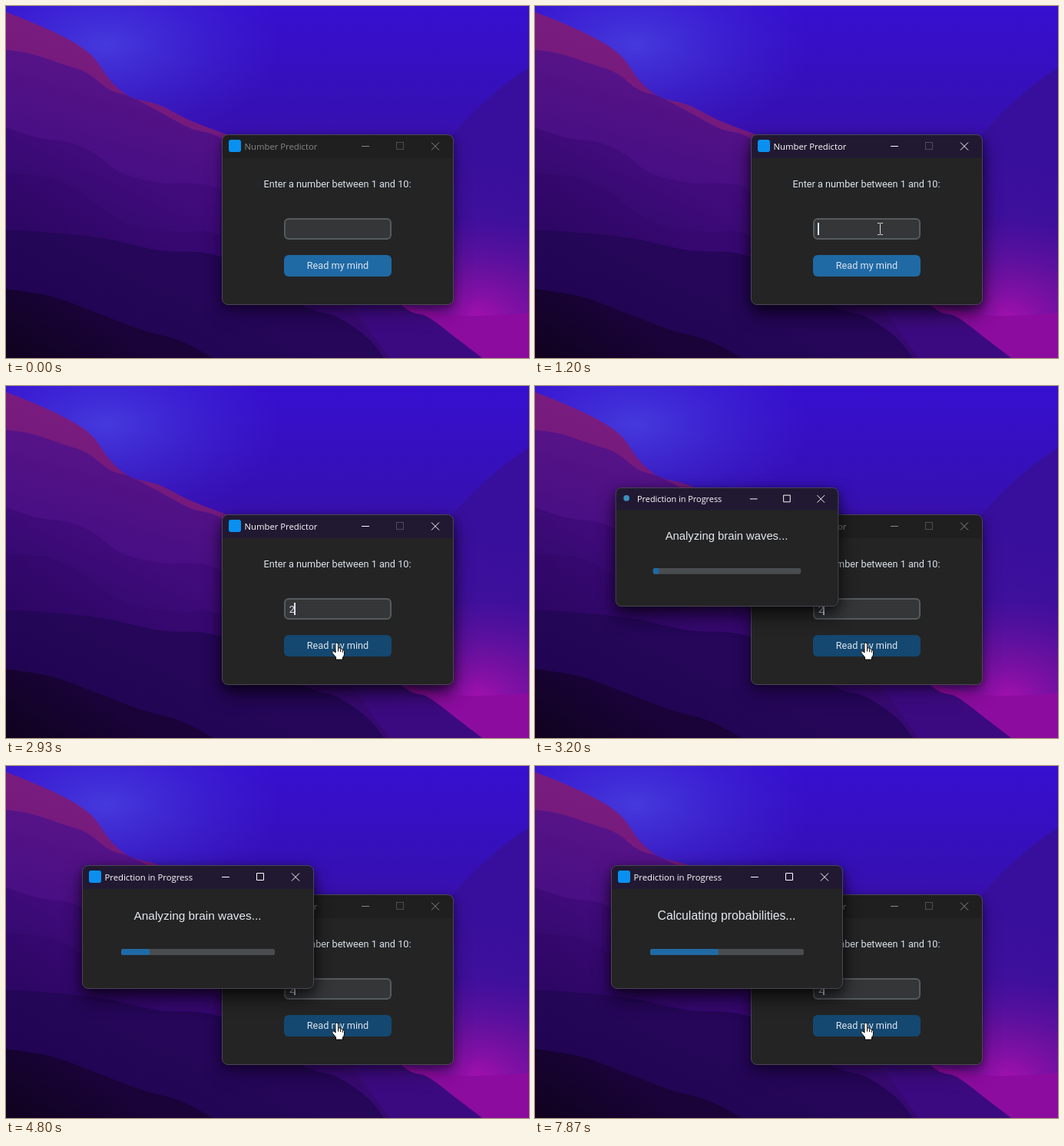
An HTML page that plays this animation: 681x458 px, repeating every 8 s.

```html
<!DOCTYPE html>
<html lang="en">
<head>
<meta charset="utf-8">
<title>Number Predictor</title>
<style>
  html, body { margin: 0; width: 100%; height: 100%; overflow: hidden; background: #1a0540; }
  svg { display: block; width: 681px; height: 458px; }
  text { white-space: pre; }
  .title { font: 11.3px "Open Sans", "Noto Sans", sans-serif; }
  .label { font: 12.7px Roboto, sans-serif; fill: #dce4ee; text-anchor: middle; }
  .message { font-family: "Liberation Sans", Arial, sans-serif; fill: #e4e9f0; text-anchor: middle; }
  .line { fill: none; stroke-width: 1; }
</style>
</head>
<body>
<svg viewBox="0 0 681 458" xmlns="http://www.w3.org/2000/svg">
  <defs>
    <linearGradient id="sky" x1="0" y1="0" x2="0" y2="1">
      <stop offset="0" stop-color="#360fd0"/>
      <stop offset=".3" stop-color="#3610b4"/>
      <stop offset=".62" stop-color="#48129c"/>
      <stop offset="1" stop-color="#5c0c98"/>
    </linearGradient>
    <radialGradient id="haze">
      <stop offset="0" stop-color="#4a48e4" stop-opacity=".75"/>
      <stop offset="1" stop-color="#4030d8" stop-opacity="0"/>
    </radialGradient>
    <radialGradient id="glow">
      <stop offset="0" stop-color="#b010b0" stop-opacity=".85"/>
      <stop offset=".45" stop-color="#9010a4" stop-opacity=".5"/>
      <stop offset="1" stop-color="#7010a0" stop-opacity="0"/>
    </radialGradient>
    <filter id="soft" x="-30%" y="-40%" width="160%" height="180%">
      <feGaussianBlur stdDeviation="13"/>
    </filter>
    <filter id="near" x="-30%" y="-40%" width="160%" height="180%">
      <feGaussianBlur stdDeviation="6"/>
    </filter>
  </defs>

  <g id="wallpaper">
    <rect width="681" height="458" fill="url(#sky)"/>
    <ellipse cx="130" cy="50" rx="230" ry="130" fill="url(#haze)"/>
  </g>

  <g id="main">
    <rect id="mainFar" x="281" y="179" width="302" height="222" rx="12" filter="url(#soft)"/>
    <rect x="281" y="171" width="302" height="222" rx="8" filter="url(#near)" opacity=".4"/>
    <rect x="281.5" y="167.5" width="301" height="221" rx="7.5" fill="#242424"/>
    <path id="mainBar" d="M282 198V175a7 7 0 0 1 7-7H575a7 7 0 0 1 7 7V198z"/>
    <rect class="line" x="281.5" y="167.5" width="301" height="221" rx="7.5" stroke="#4a4654"/>
    <rect x="290" y="174" width="16" height="16" rx="3" fill="#0a90f0"/>
    <text id="mainTitle" class="title" x="310.5" y="187">Number Predictor</text>
    <path id="mainKeys" class="line" d="M463 182.500h10M554 177.500l10 10m0-10l-10 10"/>
    <rect class="line" x="508.500" y="177.500" width="9" height="9" stroke="#504c56"/>
    <text class="label" x="431.500" y="236">Enter a number between 1 and 10:</text>
    <rect x="363" y="277" width="138" height="26" rx="5" fill="#343638" stroke="#565b5e" stroke-width="2"/>
    <text id="digit" class="label" x="372.300" y="294.500">2</text>
    <rect id="caret" y="282" width="2" height="16" fill="#dce4ee"/>
    <rect id="button" x="362" y="324" width="140" height="28" rx="6"/>
    <text class="label" x="432" y="342">Read my mind</text>
  </g>

  <g id="popup">
    <rect x="99" y="140" width="302" height="162" rx="12" filter="url(#soft)" opacity=".58"/>
    <rect x="99" y="133" width="302" height="161" rx="8" filter="url(#near)" opacity=".4"/>
    <rect x="99.500" y="129.500" width="301" height="160" rx="7.500" fill="#242424"/>
    <path d="M100 160V137a7 7 0 0 1 7-7H393a7 7 0 0 1 7 7V160z" fill="#211932"/>
    <rect class="line" x="99.500" y="129.500" width="301" height="160" rx="7.500" stroke="#4a4654"/>
    <circle id="dot" cx="114" cy="143.500" r="4" fill="#3c8fc0"/>
    <rect id="tile" x="108" y="136" width="16" height="16" rx="3" fill="#0a90f0"/>
    <text class="title" x="128.500" y="149" fill="#fff">Prediction in Progress</text>
    <path class="line" stroke="#fff" d="M281 144.500h10M326.500 139.500h9v9h-9zM372 139.500l10 10m0-10l-10 10"/>
    <text id="message" class="message" x="249.500" y="200"/>
    <rect x="150" y="238" width="200" height="8" rx="2.500" fill="#4a4d50"/>
    <rect id="fill" x="150" y="238" height="8" rx="2.500" fill="#1f6aa5"/>
  </g>

  <g id="pointer">
    <path id="arrow" d="M0 0V16.500L3.800 13L6.300 18.800L8.800 17.700L6.300 12H11.500z" fill="#fff" stroke="#000" stroke-width="1"/>
    <path id="beam" class="line" stroke="#d8d8d8" d="M-3 -7.500h2.500q1 0 1 1q0-1 1-1h2.500M.5 -6.500V6.500M-3 7.500h2.500q1 0 1-1q0 1 1 1h2.500"/>
    <g id="hand">
      <path d="M-2 1.500Q-2 0 -.5 0Q1.500 0 1.500 2V7Q3.800 6 4.600 8Q6.700 7.200 7.400 9.200Q9.500 8.800 9.500 11.500V15Q9.500 17.500 7.500 19V22H-1.500V19L-6 13.500Q-7 11.500 -5.300 10.800Q-4 10.500 -2 13z" fill="#fff" stroke="#000" stroke-width="1"/>
      <path class="line" stroke="#000" d="M1.500 7v4.500M4.600 8.500v3.500M7.300 9.700v3"/>
    </g>
  </g>
</svg>
<script>
const LOOP = 8000;
const NS = 'http://www.w3.org/2000/svg';
const el = Object.fromEntries([...document.querySelectorAll('[id]')].map(n => [n.id, n]));
const set = (node, attrs) => { for (const k in attrs) node.setAttribute(k, attrs[k]); };
const add = (tag, attrs, parent) => {
  const node = document.createElementNS(NS, tag);
  set(node, attrs);
  return parent.appendChild(node);
};
const show = (node, on) => node.setAttribute('visibility', on ? 'visible' : 'hidden');
const clamp = x => Math.min(1, Math.max(0, x));
const lerp = (a, b, p) => a + (b - a) * p;
const span = (t, a, b) => clamp((t - a) / (b - a));
const easeOut = p => 1 - (1 - p) ** 2;
const easeInOut = p => p * p * (3 - 2 * p);
const mix = (a, b, p) => `rgb(${a.map((v, i) => Math.round(lerp(v, b[i], p)))})`;

// Smooth curve through the given points.
function curve(pts) {
  let d = `M${pts[0]}`;
  for (let i = 0; i < pts.length - 1; i++) {
    const a = pts[i - 1] || pts[i], b = pts[i], c = pts[i + 1], e = pts[i + 2] || c;
    d += `C${b[0] + (c[0] - a[0]) / 6} ${b[1] + (c[1] - a[1]) / 6} ` +
         `${c[0] - (e[0] - b[0]) / 6} ${c[1] - (e[1] - b[1]) / 6} ${c}`;
  }
  return d;
}

let hills = 0;
function hill(pts, top, bottom, depth, close = 'V458H0z') {
  const id = 'hill' + hills++;
  const ys = pts.map(p => p[1]);
  const y = Math.min(...ys);
  const grad = add('linearGradient', {
    id, gradientUnits: 'userSpaceOnUse', x1: 60, y1: y, x2: 0, y2: y + depth
  }, el.wallpaper);
  add('stop', { offset: 0, 'stop-color': top }, grad);
  add('stop', { offset: 1, 'stop-color': bottom }, grad);
  add('path', { d: curve(pts) + close, fill: `url(#${id})` }, el.wallpaper);
}

function paintWallpaper() {
  hill([[681, 80], [645, 106], [605, 142], [575, 178], [540, 250]],
    '#380f9c', '#50129a', 280, 'V458H681z');
  add('ellipse', { cx: 615, cy: 405, rx: 190, ry: 130, fill: 'url(#glow)' }, el.wallpaper);
  hill([[480, 376], [515, 388], [550, 396], [600, 403], [681, 400]],
    '#8c0ca0', '#7a0496', 80, 'V458H480z');
  hill([[0, 8], [38, 23], [84, 45], [113, 66], [137, 98], [162, 118], [200, 129], [240, 149], [290, 168]],
    '#7c1c80', '#6c1878', 150);
  hill([[0, 57], [32, 62], [72, 75], [105, 87], [135, 109], [162, 118], [195, 135], [240, 159],
    [290, 178], [400, 270], [510, 385], [550, 405], [590, 435], [620, 458]],
    '#581488', '#3c0a80', 210);
  hill([[0, 158], [40, 171], [85, 178], [117, 193], [150, 217], [200, 230], [282, 240], [400, 330], [500, 458]],
    '#420b7c', '#2c0868', 130);
  hill([[0, 218], [55, 223], [95, 241], [130, 267], [165, 285], [225, 294], [282, 300], [390, 380], [490, 458]],
    '#360870', '#2a0660', 100);
  hill([[0, 291], [60, 295], [130, 303], [200, 318], [282, 327], [385, 389], [430, 404], [470, 431], [492, 458]],
    '#250658', '#1e0450', 130);
  hill([[0, 368], [60, 378], [115, 398], [175, 421], [225, 435], [270, 458]],
    '#190338', '#10021e', 90);
}

const messages = [
  [0, 'Analyzing brain waves...', 15.4],
  [5400, 'Scanning memories...', 15.7],
  [7700, 'Calculating probabilities...', 15.8]
];
// Time and right edge of the progress bar.
const progress = [
  [3130, 158], [3730, 168], [3930, 171], [4130, 175], [4730, 187],
  [5930, 206], [6130, 210], [6730, 219], [7870, 239], [8000, 241]
];

function barEdge(t) {
  const m = t % 200;
  const tick = Math.max(3130, t - m + (m >= 130 ? 130 : m >= 70 ? 70 : -70));
  const i = Math.max(1, progress.findIndex(p => p[0] >= tick));
  const [a, b] = [progress[i - 1], progress[i]];
  return Math.round(lerp(a[1], b[1], span(tick, a[0], b[0])));
}

function drawPointer(t) {
  let x, y;
  if (t < 2470) {
    const p = easeOut(span(t, 170, 950));
    x = lerp(695, 449, p);
    y = lerp(462, 290, p);
  } else {
    const p = easeInOut(span(t, 2470, 2900));
    x = lerp(449, 431, p);
    y = lerp(290, 334, p);
  }
  const inside = x > 362 && x < 502;
  const overEntry = inside && y >= 276 && y < 304;
  const overButton = inside && y >= 324 && y < 352;
  set(el.pointer, { transform: `translate(${Math.round(x)} ${Math.round(y)})` });
  show(el.beam, overEntry);
  show(el.hand, overButton);
  show(el.arrow, !overEntry && !overButton);
  set(el.button, { fill: overButton ? '#144870' : '#1f6aa5' });
}

function drawMain(t) {
  const focus = t < 3130 ? span(t, 930, 1130) : 1 - span(t, 3130, 3200);
  const ink = mix([136, 136, 136], [255, 255, 255], focus);
  set(el.mainBar, { fill: mix([31, 31, 31], [33, 25, 50], focus) });
  set(el.mainTitle, { fill: ink });
  set(el.mainKeys, { stroke: ink });
  set(el.mainFar, { opacity: lerp(.25, .58, focus) });

  const typed = t >= 1930;
  const lit = t >= 1000 && (t - 1000) % 900 < 600 || t >= 7270;
  show(el.digit, typed);
  show(el.caret, lit);
  set(el.caret, { x: typed ? 375 : 368 });
}

function drawPopup(t) {
  const open = t >= 3130;
  el.popup.style.display = open ? '' : 'none';
  if (!open) return;
  const k = lerp(.91, 1, easeOut(span(t, 3130, 3330)));
  set(el.popup, {
    opacity: lerp(.4, 1, span(t, 3120, 3200)),
    transform: `translate(250 209.5) scale(${k}) translate(-250 -209.5)`
  });
  const branded = t >= 3400;
  show(el.dot, !branded);
  show(el.tile, branded);
  const [, words, size] = messages.filter(m => t >= m[0]).pop();
  el.message.textContent = words;
  el.message.style.fontSize = size + 'px';
  set(el.fill, { width: barEdge(t) - 150 });
}

function render(t) {
  drawMain(t);
  drawPopup(t);
  drawPointer(t);
}

paintWallpaper();
const start = performance.now();
function frame() {
  render((performance.now() - start) % LOOP);
  requestAnimationFrame(frame);
}
render(0);
requestAnimationFrame(frame);
</script>
</body>
</html>
```
